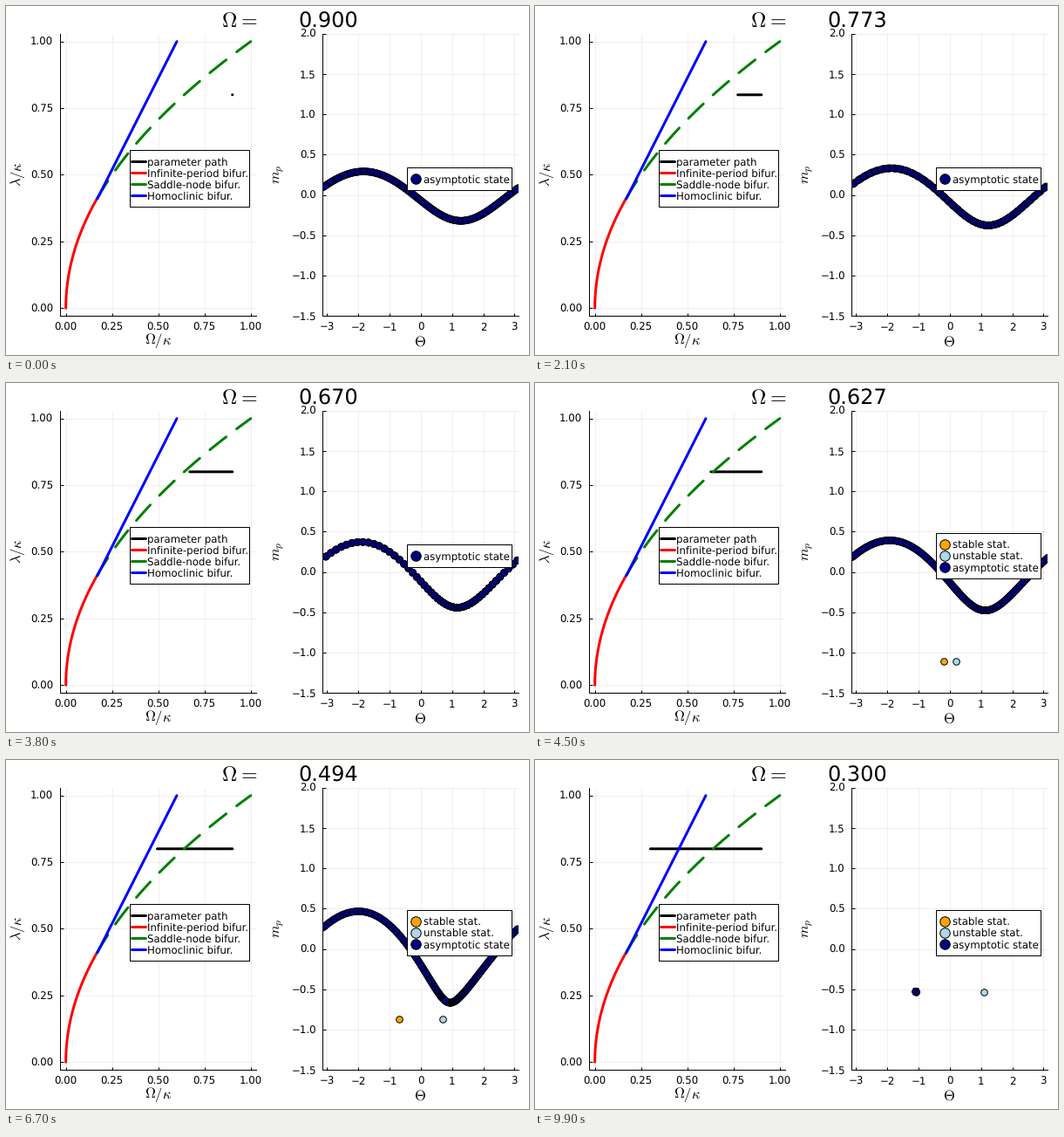
A matplotlib script that plays this animation: 600 by 400 pixels, repeating every 10 s.

```python
import numpy as np
import matplotlib.pyplot as plt
from matplotlib.animation import FuncAnimation
from matplotlib.patches import Rectangle

W, H, DPI = 600, 400, 100
PX = 72 / DPI  # points per pixel
FRAMES = 100
LAM, DAMP = 0.8, 0.25
SCALE = np.sqrt(2) / LAM
SAMPLES = 250

plt.rcParams.update({
    "font.family": "DejaVu Sans",
    "mathtext.fontset": "cm",
    "text.hinting": "none",
})

omegas = np.linspace(0.9, 0.3, FRAMES)


def flow(state):
    theta, u = state
    return np.array([omegas + u, -DAMP * (u + LAM**2 * np.cos(theta))])


def rk4(state, dt):
    k1 = flow(state)
    k2 = flow(state + dt / 2 * k1)
    k3 = flow(state + dt / 2 * k2)
    k4 = flow(state + dt * k3)
    return state + dt / 6 * (k1 + 2 * k2 + 2 * k3 + k4)


def attractors(dt=0.2, settle=1500):
    """Long-time orbits for all drive values at once."""
    state = np.array([np.full(FRAMES, -2.0), np.full(FRAMES, 0.5)])
    for _ in range(settle):
        state = rk4(state, dt)
    orbit = []
    for _ in range(SAMPLES):
        state = rk4(state, dt)
        orbit.append(state)
    theta, u = np.moveaxis(np.array(orbit), 1, 0)
    theta = (theta + np.pi) % (2 * np.pi) - np.pi
    return theta, SCALE * u


thetas, moments = attractors()

fig = plt.figure(figsize=(W / DPI, H / DPI), dpi=DPI, facecolor="white")


def panel(x0, x1, xlim, ylim, xticks, yticks):
    y0, y1 = 31.5, 355.4
    ax = fig.add_axes([x0 / W, 1 - y1 / H, (x1 - x0) / W, (y1 - y0) / H])
    ax.set(xlim=xlim, ylim=ylim, xticks=xticks, yticks=yticks)
    ax.tick_params(direction="in", length=3.5 * PX, width=PX,
                   labelbottom=False, labelleft=False)
    ax.spines[["top", "right"]].set_visible(False)
    ax.spines[["left", "bottom"]].set_linewidth(PX)
    ax.grid(color="black", alpha=0.1, lw=0.6 * PX)
    ax.set_axisbelow(True)
    return ax


quarters = np.linspace(0, 1, 5)
left = panel(62.3, 287.2, (-0.03, 1.03), (-0.03, 1.03), quarters, quarters)
right = panel(363.3, 588.4, (-np.pi, np.pi), (-1.5, 2),
              np.arange(-3, 4), np.arange(-1.5, 2.1, 0.5))

# Overlay in pixel coordinates for text and legends
ui = fig.add_axes([0, 0, 1, 1], zorder=5)
ui.set(xlim=(0, W), ylim=(H, 0))
ui.axis("off")


def text(x, y, s, size=11.8, **kw):
    return ui.text(x, y, s, fontsize=size * PX, **kw)


def tick_labels(ax, x_fmt, y_fmt, edge):
    for v in ax.get_xticks():
        x = ax.transData.transform((v, 0))[0]
        text(x, 371.6, x_fmt.format(v).replace("-", "\u2212"), ha="center")
    for v in ax.get_yticks():
        y = H - ax.transData.transform((0, v))[1]
        text(edge, y + 4.6, y_fmt.format(v).replace("-", "\u2212"), ha="right")


tick_labels(left, "{:.2f}", "{:.2f}", 54.3)
tick_labels(right, "{:.0f}", "{:.1f}", 355.8)

mid = dict(ha="center", va="center")
text(174.5, 384, r"$\Omega/\kappa$", 16.5, **mid)
text(14, 193, r"$\lambda/\kappa$", 16.5, rotation=90, **mid)
text(475, 385, r"$\Theta$", 16.5, **mid)
text(313, 192.5, r"$m_p$", 16.5, rotation=90, **mid)
text(247, 24.3, r"$\Omega\hspace{0.05}=$", 24)
value = text(335, 24.5, "", 24)

# Bifurcation diagram
LINE = dict(lw=3 * PX, solid_capstyle="round", snap=False)
JOIN = 0.41
path, = left.plot([], [], color="black", **LINE, zorder=3)
lam = np.linspace(0, JOIN, 100)
left.plot(lam**2, lam, color="red", **LINE, zorder=4)
lam = np.linspace(JOIN, 1, 100)
left.plot(lam**2, lam, color="green", lw=3 * PX, dashes=(8, 5),
          dash_capstyle="round", zorder=5)
left.plot([0.17, 0.6], [JOIN, 1], color="blue", **LINE, zorder=6)


def box(x0, y0, x1, y1):
    return ui.add_patch(Rectangle((x0, y0), x1 - x0, y1 - y0, fc="white",
                                  ec="black", lw=PX))


box(142.1, 165.2, 279.1, 230.2)
for i, (color, name) in enumerate([
        ("black", "parameter path"), ("red", "Infinite-period bifur."),
        ("green", "Saddle-node bifur."), ("blue", "Homoclinic bifur.")]):
    y = 178.5 + 13 * i
    ui.plot([144.5, 160.5], [y, y], color=color, **LINE)
    text(162, y + 4.2, name)


def dots(ax, x, y, color, diameter, **kw):
    return ax.scatter(x, y, s=(diameter * PX)**2, c=[color] * len(x),
                      edgecolors="black", linewidths=PX, snap=False, **kw)


def dot_legend(rows, y0, y1, first):
    parts = [box(460.1, y0, 580.1, y1)]
    for i, (color, name) in enumerate(rows):
        y = first + 13 * i
        parts.append(dots(ui, [469.8], [y], color, 11.5, zorder=3))
        parts.append(text(479, y + 4.2, name))
    return parts


ROWS = [("orange", "stable stat."), ("lightblue", "unstable stat."),
        ("navy", "asymptotic state")]
short_key = dot_legend(ROWS[2:], 185.2, 211.2, 197.9)
long_key = dot_legend(ROWS, 172.2, 224.2, 184.9)

stable = dots(right, [0], [0], "orange", 7.6, zorder=3)
saddle = dots(right, [0], [0], "lightblue", 7.6, zorder=4)
orbit = dots(right, np.zeros(SAMPLES), np.zeros(SAMPLES), "navy", 7.6, zorder=5)


def update(i):
    om = omegas[i]
    value.set_text(f"{om:.3f}")
    # The tiny overhang keeps a zero-length path visible as a dot
    path.set_data([om, omegas[0] + 1e-3], [LAM, LAM])
    orbit.set_offsets(np.column_stack([thetas[:, i], moments[:, i]]))

    fixed = om < LAM**2
    if fixed:
        angle = np.arccos(om / LAM**2)
        stable.set_offsets([[-angle, -SCALE * om]])
        saddle.set_offsets([[angle, -SCALE * om]])
    for part in [stable, saddle, *long_key]:
        part.set_visible(fixed)
    for part in short_key:
        part.set_visible(not fixed)
    return []


anim = FuncAnimation(fig, update, frames=FRAMES, interval=100, repeat=True,
                     repeat_delay=0, blit=False)
plt.show()
```
